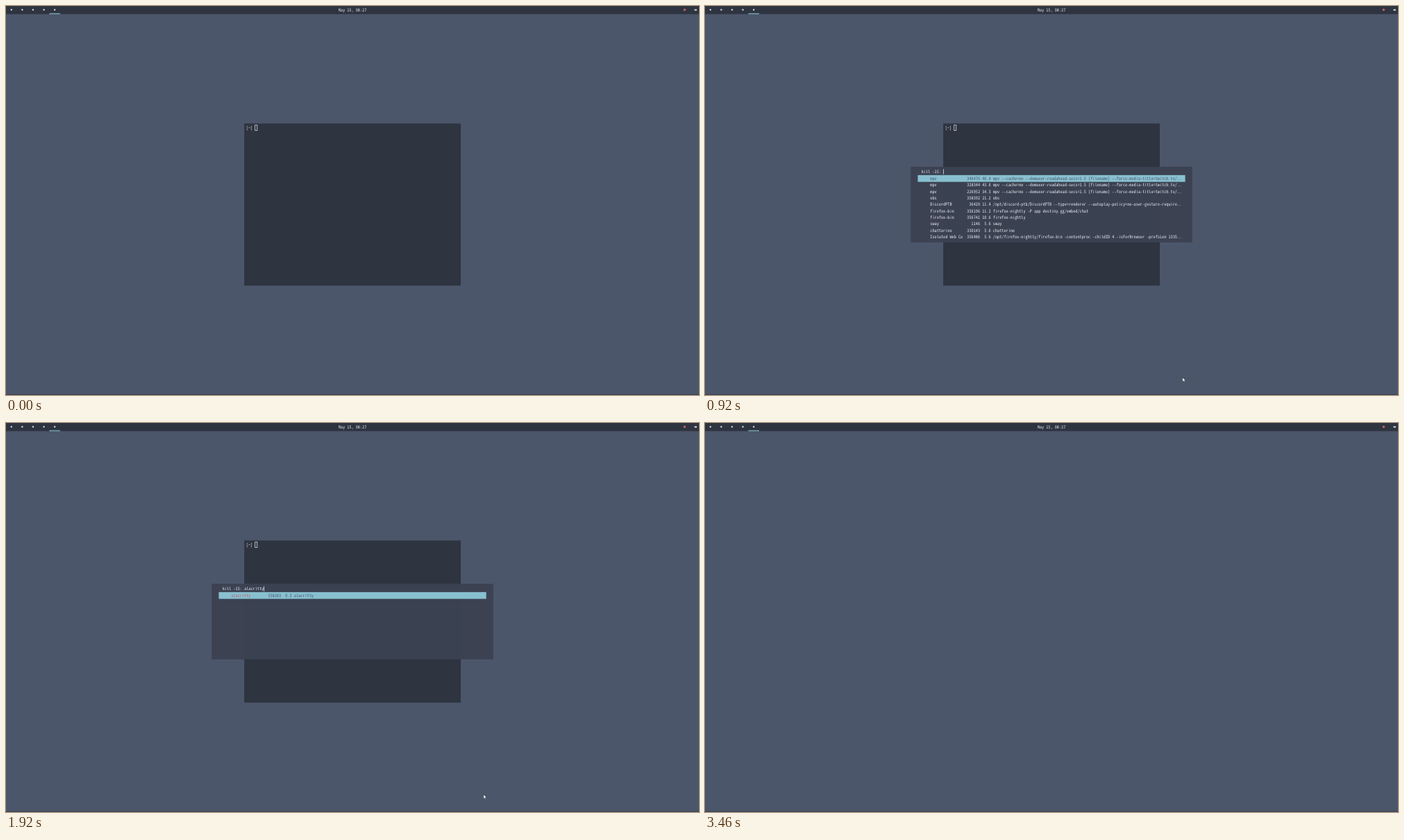
Write an HTML page that moves like this. It is 998 px wide and 561 px high and loops after 4.26 s.

```html
<!DOCTYPE html>
<html lang="en">
<head>
<meta charset="utf-8">
<title>Process killer menu</title>
<style>
  html, body { margin: 0; width: 100%; height: 100%; overflow: hidden; background: #4c566a; }
  svg { display: block; width: 100%; height: 100%; }
  text { white-space: pre; fill: #e5e9f0; text-rendering: geometricPrecision; }
  .hit { fill: #bf616a; }
  .dots { letter-spacing: -2.67px; }
  #list text:first-child { fill: #4c566a; }
</style>
</head>
<body>
<svg viewBox="0 0 2560 1440" preserveAspectRatio="none">
  <rect width="2560" height="1440" fill="#4c566a"/>
  <rect y="1437" width="2560" height="3" fill="#3b4252"/>

  <g id="bar">
    <rect width="2560" height="30" fill="#2e3440"/>
    <rect x="160" y="27" width="40" height="3" fill="#88c0d0"/>
    <g id="spaces" fill="#d8dee9"></g>
    <text x="1280" y="20" text-anchor="middle">May 15, 08:27</text>
    <circle cx="2507" cy="14" r="4.5" fill="#bf616a"/>
    <rect x="2543" y="12" width="9" height="5" fill="#d8dee9"/>
  </g>

  <g id="term">
    <rect x="880" y="435" width="800" height="600" fill="#2e3440"/>
    <text x="887" y="457">[~]</text>
    <rect id="block" x="920" y="441" width="8" height="20" stroke="#d8dee9" stroke-width="2"/>
  </g>

  <g id="menu">
    <rect x="760" y="595" width="1040" height="280" fill="#3b4252" fill-opacity=".95"/>
    <text id="prompt" x="800" y="619"></text>
    <rect id="caret" y="604" width="2" height="19" fill="#e5e9f0"/>
    <rect x="786" y="626" width="988" height="25" fill="#88c0d0"/>
    <g id="list"></g>
  </g>

  <path id="mouse" d="M0 0V16L3.7 12.6 6.2 18.4 9 17.2 6.5 11.6H11.6Z" fill="#fff" stroke="#2e3440" stroke-width="1.5"/>
</svg>
<script>
const LOOP = 4260, CELL = 8, ROW = 24;
const FONT = '"Noto Sans Mono CJK JP", "Noto Sans Mono CJK SC", "Noto Sans Mono", "DejaVu Sans Mono", monospace';
const $ = id => document.getElementById(id);

// Pick the size whose character advance fills one cell.
const pen = document.createElement('canvas').getContext('2d');
pen.font = '100px ' + FONT;
const svg = document.querySelector('svg');
svg.style.fontFamily = FONT;
svg.style.fontSize = CELL * 100 / pen.measureText('0').width + 'px';

$('spaces').innerHTML = [20, 60, 100, 140, 180]
  .map(x => `<circle cx="${x}" cy="14" r="3"/>`).join('');

const proc = (name, pid, cpu, cmd = name, near) => ({
  near,
  line: name.padEnd(17) + String(pid).padStart(6) + ' ' + cpu.padStart(4) + ' ' + cmd
});
const player = (pid, cpu, near) => proc('mpv', pid, cpu,
  'mpv --cache=no --demuxer-readahead-secs=1.5 {filename} --force-media-title=twitch.tv/…', near);
const tab = (pid, cpu, child, prefs) => proc('Isolated Web Co', pid, cpu,
  `/opt/firefox-nightly/firefox-bin -contentproc -childID ${child} -isForBrowser -prefsLen ${prefs}…`, /lat/);

const procs = [
  player(346476, '46.4', /ada/),
  player(328344, '43.6', /ada/),
  player(226952, '34.3'),
  proc('obs', 358392, '21.2'),
  proc('DiscordPTB', 36420, '11.4',
    '/opt/discord-ptb/DiscordPTB --type=renderer --autoplay-policy=no-user-gesture-require…'),
  proc('firefox-bin', 356196, '11.2', 'firefox-nightly -P app destiny.gg/embed/chat'),
  proc('firefox-bin', 356741, '10.6', 'firefox-nightly'),
  proc('sway', 1146, '5.6'),
  proc('chatterino', 330143, '5.6'),
  tab(356486, '5.6', 4, 1335),
  tab(357032, '1.9', 4, 1595),
  proc('raiderio-client', 35566, '1.3',
    '/tmp/.mount_Raider0Y7nF8/raiderio-client --type=renderer --field-trial-handle=8693571…'),
  tab(357117, '1.2', 5, 1594),
  proc('alacritty', 358283, '0.5'),
  proc('perl', 202207, '0.1',
    'perl /sbin/latexmk -verbose -file-line-error -synctex=1 -interaction=nonstopmode -lua…', /a(?=…)/)
];

const WORD = 'alacritty';
const keys = [1080, 1280, 1360, 1440, 1540, 1640, 1740, 1860, 1900];
const results = [
  [0, 1, 2, 3, 4, 5, 6, 7, 8, 9],
  [0, 1, 2, 4, 5, 7, 8, 9, 10, 11],
  [4, 11, 13, 14],
  [13, 14, 0, 1, 2, 4, 9, 10, 11, 12],
  [13, 14]
];

function markup({ line, near }, query) {
  let at = query ? line.indexOf(query) : -1, len = query.length;
  if (at < 0 && near && len > 2) {
    at = line.search(near);
    len = line.match(near)[0].length;
  }
  const out = at < 0 ? line
    : `${line.slice(0, at)}<tspan class="hit">${line.slice(at, at + len)}</tspan>${line.slice(at + len)}`;
  return out.replace('…', '<tspan class="dots" dx="-1.3">...</tspan>');
}

let shown = -1;
function fillMenu(count) {
  if (count === shown) return;
  shown = count;
  const query = WORD.slice(0, count);
  $('prompt').textContent = 'kill -15: ' + query;
  $('caret').setAttribute('x', 800 + CELL * (10 + count));
  $('list').innerHTML = (results[count] || [13])
    .map((id, i) => `<text x="832" y="${644 + ROW * i}">${markup(procs[id], query)}</text>`).join('');
}

const show = (id, on) => $(id).setAttribute('visibility', on ? 'visible' : 'hidden');
const part = (t, from, to) => Math.min(1, Math.max(0, (t - from) / (to - from)));
const REST = [1764, 1375];

function mouseAt(t) {
  const left = (1 - part(t, 240, 600)) ** 2;
  const away = part(t, 3320, 3460) ** 1.5;
  return [REST[0] + 140 * left + 796 * away, REST[1] + 62 * left - 160 * away];
}

function draw(ms) {
  const t = Math.floor(ms % LOOP / 20) * 20;
  const open = t >= 880 && t < 2500;
  const focused = t >= 260 && t < 880;
  show('term', t < 2500);
  show('menu', open);
  show('mouse', t >= 260 && t < 3460);
  $('block').setAttribute('fill', focused ? '#d8dee9' : 'none');
  $('mouse').setAttribute('transform', `translate(${mouseAt(t)})`);
  if (open) fillMenu(keys.filter(k => k <= t).length);
}

let start;
function tick(now) {
  start ??= now;
  draw(now - start);
  requestAnimationFrame(tick);
}
draw(0);
requestAnimationFrame(tick);
</script>
</body>
</html>
```
